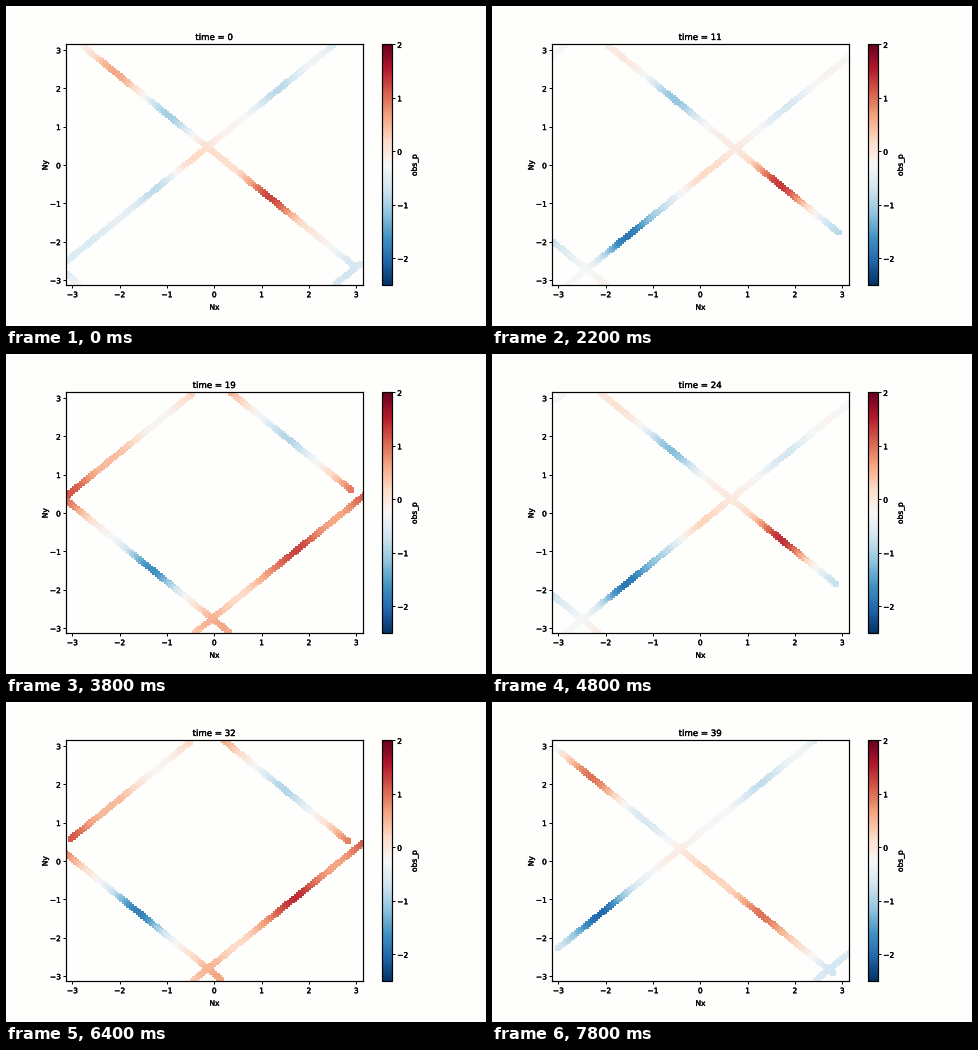
Recreate the animation shown at these times as a matplotlib script. Size 480 by 320 pixels, loop 8 s.

```python
import numpy as np
import matplotlib.pyplot as plt
from matplotlib.animation import FuncAnimation
from matplotlib.patheffects import withStroke
from matplotlib.text import Text

W, H, DPI = 480, 320, 50
PX = 72 / DPI              # points per pixel
FRAMES, STEP = 40, 200
PI, TAU = np.pi, 2 * np.pi
PAPER = "#fefefc"
COUNT, DOT = 130, 5.7      # points per track, square size in pixels
BASE, SIZE = -0.12, 0.52   # resting pressure, eddy radius

plt.rcParams.update({
    "font.family": "DejaVu Sans",
    "font.size": 7.5 * PX,
    "axes.linewidth": 1.2 * PX,
})

# Eddies: x, y, drift per step along the falling diagonal, strength
EDDIES = [
    (-1.20, -2.20, -0.02, -1.8),
    (-1.15, -0.60, 0.012, -0.75),
    (-0.70, 1.50, 0, -1.15),
    (1.50, 1.85, 0, -0.8),
    (-3.10, -1.50, 0, -0.95),
    (2.75, -2.90, 0, -0.65),
    (-2.40, 2.05, 0, 1.15),
    (-3.00, 0.60, 0, 1.2),
    (1.45, -0.60, 0.008, 1.35),
    (0.85, -1.30, 0.008, 0.55),
    (2.35, -0.10, 0, 0.5),
    (0.10, -3.00, 0, 0.75),
    (2.10, -2.40, 0, 0.35),
    (-0.40, 0.10, 0.012, 0.45),
]


def wrap(a):
    return (a + PI) % TAU - PI


def field(x, y, t):
    """Periodic pressure made of slowly drifting round eddies."""
    p = np.full_like(x, BASE)
    for cx, cy, drift, strength in EDDIES:
        dx, dy = wrap(x - cx - drift * t), wrap(y - cy + drift * t)
        p += strength * np.exp(-(dx**2 + dy**2) / (2 * SIZE**2))
    return p


def tracks(t):
    """Points of the falling and the rising track at step t."""
    span = np.linspace(0, TAU, COUNT)
    shift = 0.0045 * t
    fall = 2.975 - TAU + span - shift
    rise = -3.18 + span + shift
    x = np.concatenate([fall, rise])
    y = np.concatenate([0.32 - 0.4946 * t - fall, 0.61 + 0.4864 * t + rise])
    return x, wrap(y)


def panel(left, right, top=38.4, bottom=279.4):
    box = [left / W, 1 - bottom / H, (right - left) / W, (bottom - top) / H]
    return fig.add_axes(box, facecolor=PAPER)


def label(x, y, text, angle=0):
    fig.text(x / W, 1 - y / H, text, rotation=angle, ha="center", va="center")


fig = plt.figure(figsize=(W / DPI, H / DPI), dpi=DPI, facecolor=PAPER)
ax = panel(59.6, 356.9)
ax.set(xlim=(-PI, PI), ylim=(-PI, PI),
       xticks=range(-3, 4), yticks=range(-3, 4))
dots = ax.scatter([], [], c=[], s=(DOT * PX) ** 2, marker="s", linewidths=0,
                  cmap="RdBu_r", vmin=-2.51, vmax=2)
title = ax.set_title("time = 0", fontsize=8.6 * PX, pad=4.4 * PX)

cax = panel(376.2, 386.4)
fig.colorbar(dots, cax=cax, ticks=range(-2, 3))
for a in (ax, cax):
    a.tick_params(length=2.6 * PX, pad=2.2 * PX, width=PX)

label(208.5, 301.3, "Nx")
label(39, 159.2, "Ny", 90)
label(408.3, 159.2, "obs_p", 90)

# Slightly heavier lettering
for text in fig.findobj(Text):
    text.set_path_effects([withStroke(linewidth=0.35 * PX, foreground="k")])


def draw(t):
    x, y = tracks(t)
    dots.set_offsets(np.column_stack([x, y]))
    dots.set_array(field(x, y, t))
    title.set_text(f"time = {t}")
    return dots, title


anim = FuncAnimation(fig, draw, frames=FRAMES, interval=STEP, repeat=True,
                     repeat_delay=0)
plt.show()
```
